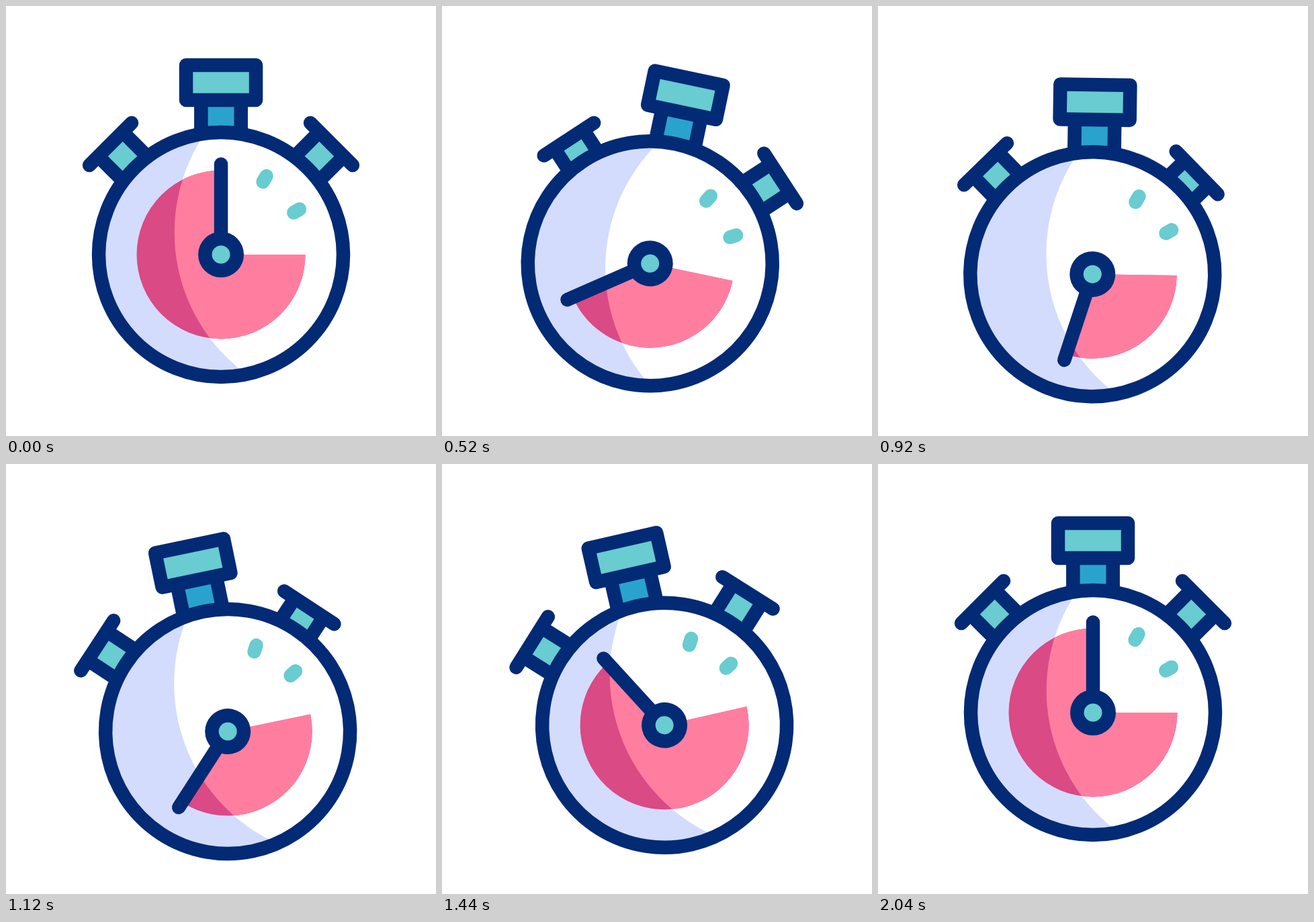
Write an HTML page with a canvas that moves like this. It is 640x640 px and loops after 2.32 s.

```html
<!DOCTYPE html>
<html lang="en">
<head>
<meta charset="utf-8">
<title>Stopwatch</title>
<style>
  html, body { margin: 0; width: 100%; height: 100%; overflow: hidden; background: #fff; }
  canvas { display: block; width: 100vw; height: 100vh; }
</style>
</head>
<body>
<canvas id="stage" width="640" height="640"></canvas>
<script>
const ctx = document.getElementById('stage').getContext('2d');
const LOOP = 2320, STEP = 40, BEGIN = 40, END = 2040;
const TAU = Math.PI * 2, DEG = Math.PI / 180;
const NAVY = '#032a75', TEAL = '#68ccd1', BLUE = '#2aa2ce', PINK = '#ff7ea0',
      ROSE = '#da4a85', LILAC = '#d3dcfd', WHITE = '#fff';
const LINE = 20.5, RING = 182, BAR = 232.6;

const easeInOut = (p, power) => p < 0.5
  ? Math.pow(2 * p, power) / 2
  : 1 - Math.pow(2 - 2 * p, power) / 2;

// Eased move from one value to another, held before and after.
function move(t, t0, t1, from, to, power = 2.5) {
  const p = Math.min(1, Math.max(0, (t - t0) / (t1 - t0)));
  return from + (to - from) * easeInOut(p, power);
}

// Goes from zero to a peak and back.
const swing = (t, t0, mid, t1, peak) =>
  t < mid ? move(t, t0, mid, 0, peak) : move(t, mid, t1, peak, 0);

const drop = t => swing(t, BEGIN, 1010, END, 29.4);
const sweep = t => swing(t, BEGIN, 805, 1755, -165);
const pressLeft = t => swing(t, 225, 710, 1050, 16);
const pressRight = t => swing(t, 400, 940, 1415, 16);

function tilt(t) {
  const right = 11.9, left = -13.2;
  if (t < 570) return move(t, BEGIN, 570, 0, right, 3);
  if (t < 1300) return move(t, 570, 1300, right, left, 3);
  return move(t, 1300, END, left, 0, 3);
}

function disc(x, y, r, color) {
  ctx.beginPath();
  ctx.arc(x, y, r, 0, TAU);
  ctx.fillStyle = color;
  ctx.fill();
}

function line(x1, y1, x2, y2, color = NAVY, cap = 'round') {
  ctx.beginPath();
  ctx.moveTo(x1, y1);
  ctx.lineTo(x2, y2);
  ctx.strokeStyle = color;
  ctx.lineCap = cap;
  ctx.stroke();
}

function stem(half, top, color) {
  ctx.fillStyle = color;
  ctx.fillRect(-half, -top, half * 2, top - RING);
  for (const x of [-half, half]) line(x, -RING + 10, x, -top, NAVY, 'butt');
}

function sideButton(angle, press) {
  ctx.save();
  ctx.rotate(angle * DEG);
  const top = BAR - press;
  stem(25.7, top, TEAL);
  line(-44.5, -top, 44.5, -top);
  ctx.restore();
}

function crown() {
  stem(29.7, 230, BLUE);
  ctx.beginPath();
  ctx.rect(-52, -282, 104, 52);
  ctx.fillStyle = TEAL;
  ctx.fill();
  ctx.strokeStyle = NAVY;
  ctx.stroke();
}

// Fills the current path in two tones, split by the big shadow circle.
function twoTone(dark, light) {
  ctx.save();
  ctx.clip();
  ctx.fillStyle = dark;
  ctx.fillRect(-200, -200, 400, 400);
  disc(192, -33, 261.3, light);
  ctx.restore();
}

function dial(hand) {
  ctx.beginPath();
  ctx.arc(0, 0, RING, 0, TAU);
  twoTone(LILAC, WHITE);

  ctx.beginPath();
  ctx.moveTo(0, 0);
  ctx.arc(0, 0, 125.5, 0, (270 + hand) * DEG);
  ctx.closePath();
  twoTone(ROSE, PINK);

  for (const a of [30, 60]) {
    const x = Math.sin(a * DEG), y = -Math.cos(a * DEG);
    line(x * 125, y * 125, x * 135, y * 135, TEAL);
  }

  ctx.beginPath();
  ctx.arc(0, 0, RING, 0, TAU);
  ctx.strokeStyle = NAVY;
  ctx.stroke();

  ctx.save();
  ctx.rotate(hand * DEG);
  line(0, 0, 0, -134.5);
  ctx.restore();
  disc(0, 0, 34, NAVY);
  disc(0, 0, 13.5, TEAL);
}

function draw(t) {
  ctx.fillStyle = WHITE;
  ctx.fillRect(0, 0, 640, 640);
  ctx.save();
  ctx.lineWidth = LINE;
  ctx.lineJoin = 'round';
  // The watch tilts about a point above the centre of its dial.
  ctx.translate(320, 320 + drop(t));
  ctx.rotate(tilt(t) * DEG);
  ctx.translate(0, 50);
  sideButton(-45, pressLeft(t));
  sideButton(45, pressRight(t));
  crown();
  dial(sweep(t));
  ctx.restore();
}

const start = performance.now();
function tick() {
  const t = (performance.now() - start) % LOOP;
  draw(Math.floor(t / STEP) * STEP);
  requestAnimationFrame(tick);
}
tick();
</script>
</body>
</html>
```
